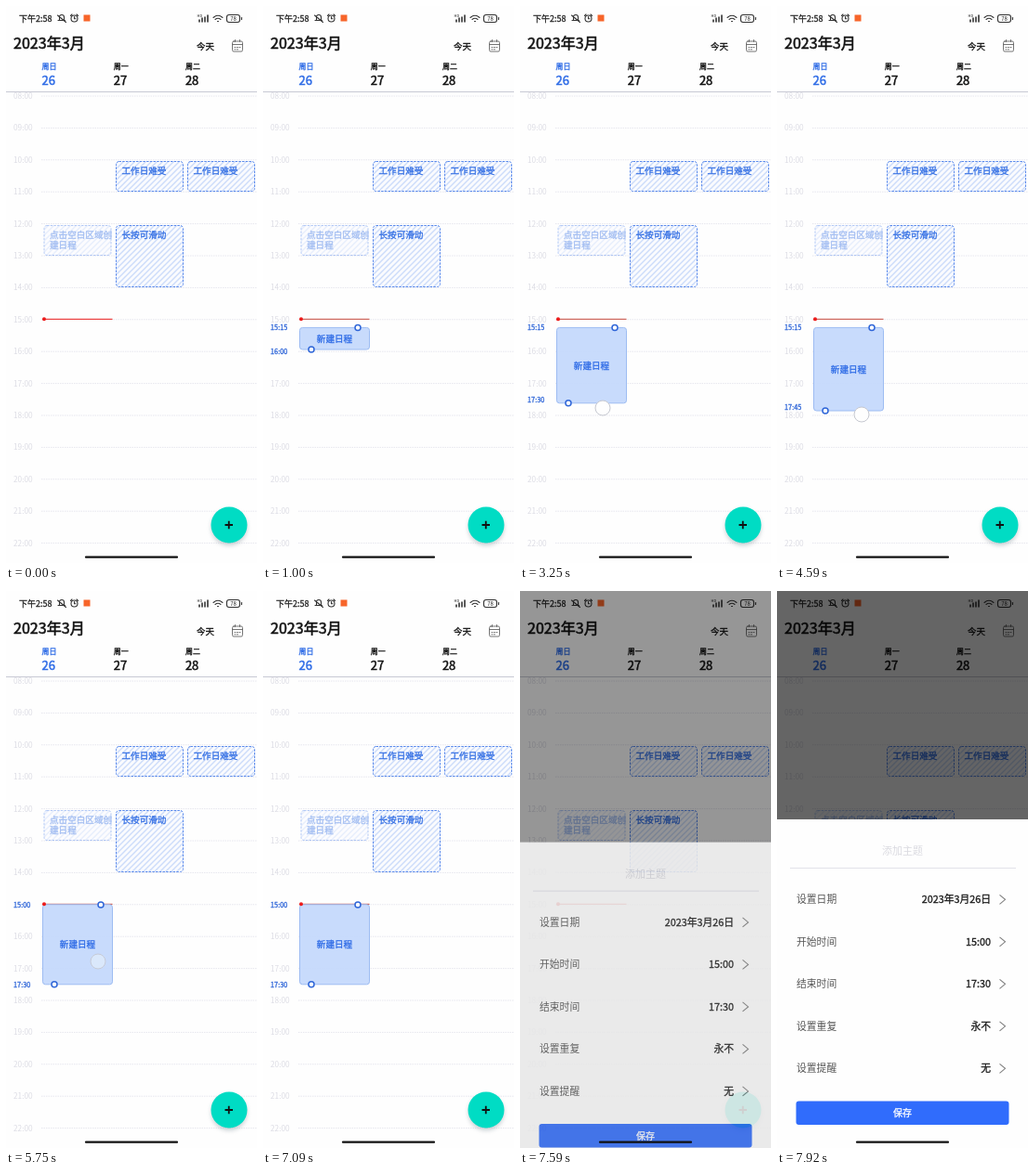
Animation of 270x600 px, one loop 8 s. Source, as an HTML page:

```html
<!DOCTYPE html>
<html lang="zh-CN">
<head>
<meta charset="utf-8">
<style>
  html, body { margin: 0; width: 100%; height: 100%; overflow: hidden; background: #fefefe; }
  svg { display: block; width: 270px; height: 600px; font-family: "Noto Sans CJK SC", "Noto Sans CJK", "Noto Sans", sans-serif; color: #111; }
  text { fill: currentColor; }
  /* A thin outline gives a medium weight. */
  .medium { stroke: currentColor; stroke-width: .3px; }
  .title { stroke-width: .5px; }
  .blue { color: #2f6ce6; }
  .icon { fill: none; stroke: #333; stroke-width: 1.1; stroke-linecap: round; }
  .hour { font-size: 8.3px; color: #dcdce4; }
  .time { font-size: 7.4px; color: #2f66d8; }
  .event rect { fill: url(#hatch); stroke: #5a8aec; stroke-dasharray: 2.5 1.2; }
  .event text { font-size: 9.6px; color: #3570e4; }
  .row text { font-size: 10.8px; color: #1c1c1c; }
  .row .name { color: #555; }
  .row path { fill: none; stroke: #808080; stroke-width: 1.1; }
</style>
</head>
<body>
<svg viewBox="0 0 270 600">
  <defs>
    <pattern id="hatch" width="6" height="6" patternUnits="userSpaceOnUse">
      <rect width="6" height="6" fill="#fafbfe"/>
      <path d="M-1 1L1-1M0 6L6 0M5 7L7 5" stroke="#ccdcfa" stroke-width="1.400"/>
    </pattern>
    <filter id="blur" x="-50%" y="-50%" width="200%" height="200%"><feGaussianBlur stdDeviation="2.5"/></filter>
  </defs>
  <rect width="270" height="600" fill="#fefefe"/>

  <g id="hours"></g>
  <rect width="270" height="92" fill="#fefefe"/>
  <path d="M0 92.5H270" stroke="#c8c9d4"/>

  <g font-size="9" color="#222">
    <text class="medium" x="14" y="17">下午2:58</text>
    <path class="icon" d="M56 15.5h7.5M57.5 15v-3a2.5 2.5 0 0 1 5 0v3M55.500 10l9 7.500"/>
    <circle class="icon" cx="73.500" cy="13.500" r="3.500"/>
    <path class="icon" d="M73.500 11.500v2.200h1.500M69.500 10.500l1.500-1.500M77.500 10.500l-1.500-1.500"/>
    <rect x="83.500" y="9.500" width="7" height="7" fill="#f7652a"/>
    <text x="205.500" y="12" font-size="4">HD</text>
    <path d="M208 17.500v-3M211 17.500v-5M214 17.500v-6M217 17.500v-8" stroke="#333" stroke-width="1.600"/>
    <path class="icon" stroke-width="1.300" d="M223 12.500q5-4.500 10 0M225 14.500q3-2.500 6 0M227.500 16.500h1"/>
    <rect class="icon" x="237.500" y="9.500" width="14" height="8" rx="2.500"/>
    <path class="icon" d="M253.500 12.500v2"/>
    <text x="244.500" y="16" font-size="6" text-anchor="middle">78</text>
  </g>
  <text class="medium title" x="8" y="46" font-size="16.100">2023年3月</text>
  <text class="medium" x="205" y="47" font-size="9.500">今天</text>
  <g class="icon" style="stroke: #666; stroke-width: .9">
    <rect x="243.500" y="38" width="11" height="11" rx="1.500"/>
    <path d="M243.500 41.500h11M246.500 36.500v2M251.500 36.500v2M246 44.500h1M248.500 44.500h1M251 44.500h1M246 46.800h1M248.500 46.800h1"/>
  </g>
  <g id="days"></g>
  <g id="events"></g>

  <path id="nowLine" d="M41 337.300H114.500" stroke-width="1.200"/>
  <g id="draft">
    <rect id="box" x="39.500" width="75" rx="3" fill="#c6dafc" fill-opacity=".95" stroke="#9dbcf2"/>
    <g fill="#fff" stroke="#2f66d8" stroke-width="1.500">
      <circle id="topKnob" cx="102" r="3"/>
      <circle id="endKnob" cx="52" r="3"/>
    </g>
    <text id="draftName" class="blue medium" x="77" font-size="9.600" text-anchor="middle">新建日程</text>
    <text id="startTime" class="time medium" x="8"></text>
    <text id="endTime" class="time medium" x="8"></text>
  </g>
  <circle cx="41" cy="337.300" r="2" fill="#ec1c1c"/>
  <circle id="touch" r="8" stroke="#c6c8d0" stroke-width="1"/>

  <circle cx="240" cy="562" r="19" fill="#9aa4ac" opacity=".55" filter="url(#blur)"/>
  <circle cx="240" cy="559" r="19.500" fill="#00dcc4"/>
  <path d="M235.500 559h8.500M239.750 554.800v8.500" stroke="#111" stroke-width="1.800"/>

  <rect id="dim" width="270" height="600"/>
  <g id="sheet">
    <rect y="246" width="270" height="354" fill="#fefefe"/>
    <text x="135" y="284" font-size="11" color="#dadae0" text-anchor="middle">添加主题</text>
    <path d="M14 298.500H257" stroke="#e2e2ea"/>
    <g id="rows"></g>
    <rect x="20.500" y="549.500" width="229" height="25.500" rx="3" fill="#306cfc"/>
    <text class="medium" x="135" y="566" font-size="10" color="#fff" text-anchor="middle">保存</text>
  </g>
  <path d="M86 593.700H184" stroke="#111" stroke-width="2.200" stroke-linecap="round"/>
</svg>
<script>
const LOOP = 8000, FIRST_HOUR = 8, GRID_TOP = 97, QUARTER = 8.6;
const $ = id => document.getElementById(id);
const attrs = (id, values) => {
  for (const name in values) $(id).setAttribute(name, values[name]);
};
const quarterY = q => GRID_TOP + q * QUARTER;
const clock = q => {
  const pad = n => String(n).padStart(2, "0");
  return pad(FIRST_HOUR + Math.floor(q / 4)) + ":" + pad(q % 4 * 15);
};

$("hours").innerHTML = Array.from({ length: 15 }, (_, i) => {
  const y = quarterY(i * 4);
  return `<path d="M38 ${y}H270" stroke="#e6e6ee" stroke-dasharray="1.500 1"/>
    <text class="hour" x="8" y="${y + 3}">${clock(i * 4)}</text>`;
}).join("");
const hourLabels = document.querySelectorAll(".hour");

$("days").innerHTML = ["周日", "周一", "周二"].map((day, i) =>
  `<g class="medium ${i ? "" : "blue"}"><text x="${38.5 + i * 77.2}" y="68" font-size="8">${day}</text>
   <text class="title" x="${38.5 + i * 77.2}" y="85" font-size="13">${26 + i}</text></g>`).join("");

const eventBox = (x, y, height, lines, opacity = 1) =>
  `<g class="event" opacity="${opacity}"><rect x="${x}" y="${y}" width="72" height="${height}" rx="3"/>
   ${lines.map((line, i) => `<text class="medium" x="${x + 6}" y="${y + 13.5 + i * 11}">${line}</text>`).join("")}</g>`;
$("events").innerHTML =
  eventBox(118.5, 167.5, 32, ["工作日难受"]) +
  eventBox(195.5, 167.5, 32, ["工作日难受"]) +
  eventBox(118.5, 236.5, 66, ["长按可滑动"]) +
  eventBox(41, 236.5, 32, ["点击空白区域创", "建日程"], .45);

const settings = [["设置日期", "2023年3月26日"], ["开始时间", "15:00"],
  ["结束时间", "17:30"], ["设置重复", "永不"], ["设置提醒", "无"]];
$("rows").innerHTML = settings.map(([name, value], i) =>
  `<g class="row" transform="translate(0 ${332.3 + i * 45.5})"><text class="name" x="21" y="4">${name}</text>
   <text class="medium" x="230" y="4" text-anchor="end">${value}</text><path d="M239.500-5l6 5-6 5"/></g>`).join("");

// Smoothly interpolates [time, value] stops.
function track(t, stops) {
  const next = stops.findIndex(stop => stop[0] > t);
  if (next === 0) return stops[0][1];
  if (next < 0) return stops[stops.length - 1][1];
  const [t0, a] = stops[next - 1], [t1, b] = stops[next];
  const p = (t - t0) / (t1 - t0);
  return a + (b - a) * p * p * (3 - 2 * p);
}

function drawDraft(t) {
  const visible = t >= 900 && t < 7460;
  attrs("draft", { visibility: visible ? "visible" : "hidden" });
  attrs("nowLine", { stroke: visible ? "#cf6a60" : "#ec4444" });
  const top = track(t, [[5200, 346.4], [5650, 337.8]]);
  const end = track(t, [[2080, 370], [3200, 427.8], [3330, 427.8], [3900, 436],
    [4700, 436], [4820, 432.4], [5200, 432.4], [5650, 423.8]]);
  const startQ = Math.round((top - GRID_TOP) / QUARTER);
  const endQ = Math.round((end - GRID_TOP) / QUARTER);
  attrs("box", { y: top, height: end - top });
  attrs("topKnob", { cy: top + .2 });
  attrs("endKnob", { cy: end });
  attrs("draftName", { y: (top + end) / 2 + 3.5 });
  [["startTime", startQ], ["endTime", endQ]].forEach(([id, q]) => {
    attrs(id, { y: quarterY(q) + 2.7 });
    $(id).textContent = clock(q);
  });
  hourLabels.forEach((label, i) => {
    const covered = visible && (i * 4 === startQ || i * 4 === endQ);
    label.setAttribute("visibility", covered ? "hidden" : "visible");
  });
}

function drawTouch(t) {
  const drag = t >= 1500 && t < 4880, move = t >= 4880 && t < 6500;
  const x = drag ? track(t, [[2000, 90], [3250, 89], [4500, 91]]) : move ? 99 : 82;
  const y = drag ? track(t, [[2000, 381], [3200, 433], [3330, 433], [3900, 440]])
    : move ? track(t, [[5200, 407.6], [5650, 399]])
    : t < 1500 ? 358 : 380;
  const opacity = track(t, [[760, 0], [820, .8], [900, .8], [1000, 0], [1900, 0], [2000, .75],
    [2100, 1], [4700, 1], [4830, 0], [5000, 0], [5120, .85], [5950, .85], [6100, 0],
    [7180, 0], [7260, .8], [7360, .8], [7480, 0]]);
  attrs("touch", { cx: x, cy: y, opacity, fill: move ? "#deebfb" : "#fefefe" });
}

function drawSheet(t) {
  const open = t >= 7460;
  const p = t < 7500 ? 0 : 1 - (1 - Math.min((t - 7500) / 330, 1)) ** 3;
  attrs("dim", { opacity: open ? .11 + .49 * p : 0 });
  attrs("sheet", { opacity: open ? .5 + .5 * p : 0, transform: `translate(0 ${64 * (1 - p)})` });
}

let start;
function frame(now) {
  start ??= now;
  const t = (now - start) % LOOP;
  drawDraft(t);
  drawTouch(t);
  drawSheet(t);
  requestAnimationFrame(frame);
}
requestAnimationFrame(frame);
</script>
</body>
</html>
```
